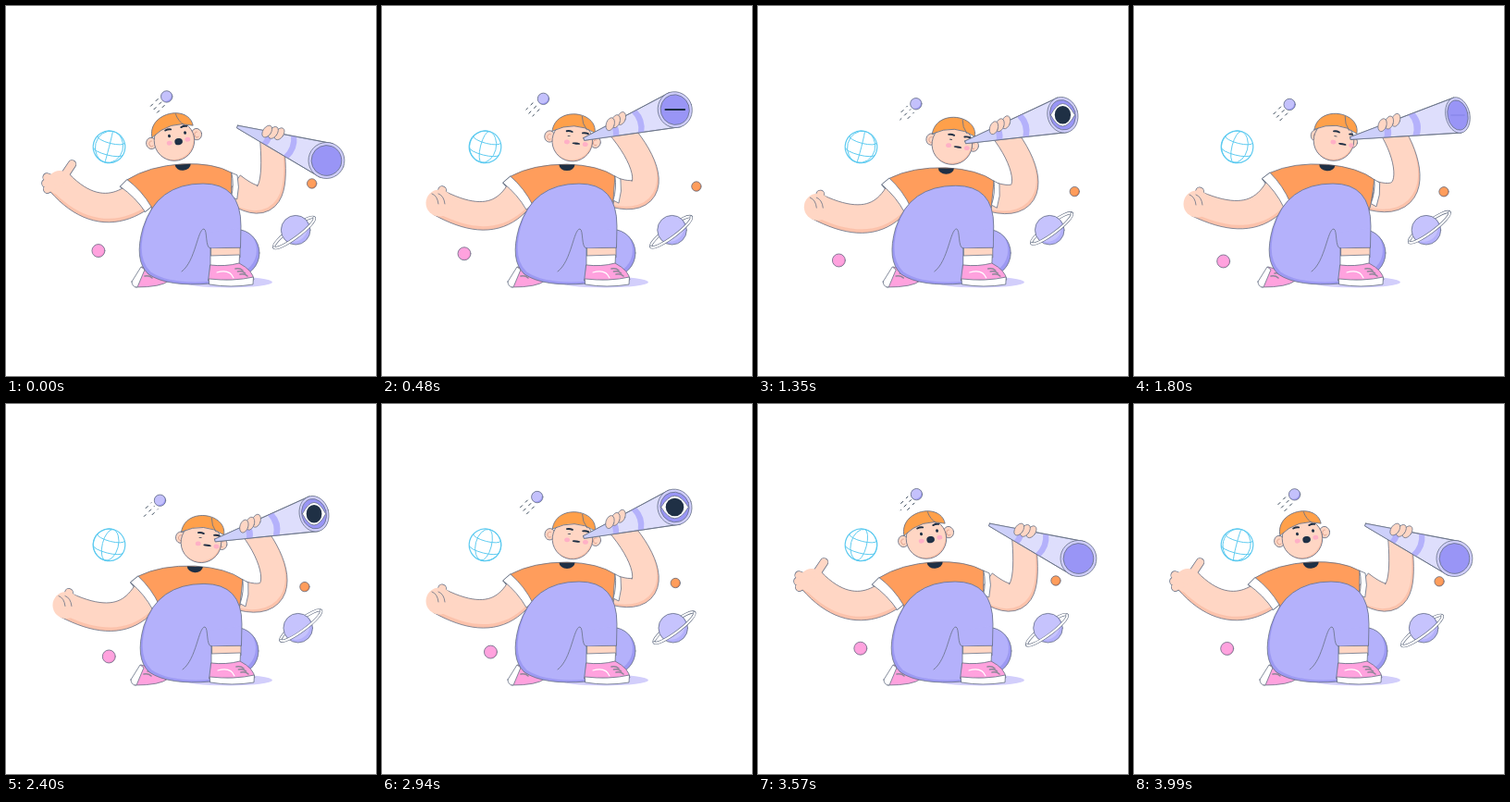
These frames come from a looping animation (400 by 400 pixels, 4.02 s). An HTML page with a canvas:

```html
<!DOCTYPE html>
<html lang="en">
<head>
<meta charset="utf-8">
<title>Stargazer</title>
<style>
html, body { margin: 0; width: 100%; height: 100%; overflow: hidden; background: #fff; }
canvas { display: block; width: 100vw; height: 100vh; }
</style>
</head>
<body>
<canvas id="stage"></canvas>
<script>
const canvas = document.getElementById('stage');
const ctx = canvas.getContext('2d');
const ratio = window.devicePixelRatio || 1;
canvas.width = canvas.height = 400 * ratio;

const LOOP = 4020, TAU = Math.PI * 2;
const LINE = '#667085', NAVY = '#1f3045', SKIN = '#ffd6c4', SKIN_DARK = '#fcc2ab', CYAN = '#5ccaf0';
const LILAC = '#b4b1fb', VIOLET = '#9c99f2', PALE = '#dedefc', PINK = '#ffa2de', ORANGE = '#ff9d5c';

// Key poses: resting, looking, leaning
const POSES = {
  head: [[182, 145.5, -.2], [206, 146, .13], [216, 145.5, .19]],          // x, y, tilt
  scope: [[250, 130.5, 346.5, 167, 19.5], [218, 144, 316.5, 111.5, 18.5], [234, 143, 350, 118, 13]], // tip, lens, lens width
  armL: [[143, 206, 118, 224, 88, 224, 58, 191], [149, 204, 130, 231, 102, 234, 62, 213], [157, 200, 138, 229, 110, 233, 68, 214]],
  armR: [[244, 196, 291, 231, 292, 190], [253, 202, 298, 214, 293, 172], [258, 205, 307, 218, 301, 168]]
};

// start, end, from, to
const MOVES = [[90, 540, 0, 1], [1140, 1600, 1, 2], [2160, 2640, 2, 1], [3250, 3550, 1, 0]];
const LIDS = [[990, 1200, 0, 1], [1690, 1790, 1, 0], [1820, 1950, 0, 1], [3150, 3260, 1, 0]];

const ease = k => k < .5 ? 4 * k ** 3 : 1 - (2 - 2 * k) ** 3 / 2;

function track(steps, t) {
  let v = steps[0][2];
  for (const [a, b, from, to] of steps) {
    if (t >= a) v = from + (to - from) * ease(Math.min(1, (t - a) / (b - a)));
  }
  return v;
}

function blend(list, s) {
  const i = Math.min(1, Math.floor(s));
  return list[i].map((v, j) => v + (list[i + 1][j] - v) * (s - i));
}

const path = d => new Path2D(d);

function oval(x, y, rx, ry = rx, rot = 0, from = 0, to = TAU) {
  const p = new Path2D();
  p.ellipse(x, y, rx, ry, rot, from, to);
  return p;
}

function segment(x, y, x2, y2) {
  const p = new Path2D();
  p.moveTo(x, y);
  p.lineTo(x2, y2);
  return p;
}

function stroke(p, color = LINE, width = .8) {
  ctx.strokeStyle = color;
  ctx.lineWidth = width;
  ctx.stroke(p);
}

function fill(p, color, line = LINE) {
  ctx.fillStyle = color;
  ctx.fill(p);
  if (line) stroke(p, line);
}

function shaded(p, base, dark, dx, dy) {
  fill(p, dark, null);
  ctx.save();
  ctx.clip(p);
  ctx.translate(dx, dy);
  fill(p, base, null);
  ctx.restore();
  stroke(p);
}

function inFrame(x, y, rot, paint) {
  ctx.save();
  ctx.translate(x, y);
  ctx.rotate(rot);
  paint();
  ctx.restore();
}

// Tapered tube along a cubic curve
function tube([x0, y0, x1, y1, x2, y2, x3, y3], wide, narrow) {
  const left = [], right = [], steps = 20;
  for (let i = 0; i <= steps; i++) {
    const k = i / steps, m = 1 - k;
    const at = (a, b, c, d) => m**3 * a + 3*m*m*k * b + 3*m*k*k * c + k**3 * d;
    const slope = (a, b, c, d) => m*m * (b - a) + 2*m*k * (c - b) + k*k * (d - c);
    const dx = slope(x0, x1, x2, x3), dy = slope(y0, y1, y2, y3);
    const w = (wide + (narrow - wide) * k) / Math.hypot(dx, dy);
    const x = at(x0, x1, x2, x3), y = at(y0, y1, y2, y3);
    left.push([x - dy * w, y + dx * w]);
    right.unshift([x + dy * w, y - dx * w]);
  }
  const p = new Path2D();
  [...left, ...right].forEach(q => p.lineTo(...q));
  p.closePath();
  return p;
}

function globe(t) {
  const r = 17.3, spin = t / LOOP * TAU;
  inFrame(111.5, 152.3, .25, () => {
    stroke(oval(0, 0, r), CYAN, 1.2);
    for (let i = 0; i < 6; i++) {
      const a = spin + i * TAU / 6, x = Math.sin(a);
      if (Math.cos(a) < 0) continue;
      const from = x < 0 ? TAU / 4 : -TAU / 4;
      stroke(oval(0, 0, r * Math.abs(x), r, 0, from, from + TAU / 2), CYAN, .9);
    }
    for (const y of [-8, 5]) stroke(oval(0, y, Math.sqrt(r * r - y * y), 4, 0, 0, TAU / 2), CYAN, .9);
  });
}

function planets(t) {
  const wave = shift => Math.cos((t / LOOP + shift) * TAU);
  globe(t);

  const cx = 170.5 + 4 * wave(-.1), cy = 102 - 4.5 * wave(.07);
  ctx.save();
  ctx.setLineDash([3, 5]);
  ctx.lineDashOffset = -t / 45;
  for (let i = -1; i <= 1; i++) {
    const x = cx - 6 + i * 3.5, y = cy + 6 + i * 3.5, len = i ? 13 : 16;
    stroke(segment(x, y, x - len * .7, y + len * .7), NAVY, .9);
  }
  ctx.restore();
  shaded(oval(cx, cy, 6.2), '#c4c1fc', VIOLET, -1.2, -1.2);
  shaded(oval(101 + 16.5 * wave(.26), 270 - 6 * wave(.07), 7), PINK, '#f58fce', -1, -1);
  shaded(oval(330.7 + 13.5 * wave(-.25), 196 - 5 * wave(.1), 5.2), ORANGE, '#ec8449', -1, -1);

  const half = from => {
    const arc = oval(315.5 - 4 * wave(0), 242 + 3 * wave(0), 27, 5.5, -.64, from, from + TAU / 2);
    stroke(arc, LINE, 3.3);
    stroke(arc, '#fff', 2.1);
  };
  half(TAU / 2);
  shaded(oval(314.6 - 1.4 * wave(0), 242.2, 15.8), '#c6c3fd', LILAC, -3, -3);
  half(0);
}

function laces(x, y, dx, dy, count) {
  for (let i = 0; i < count; i++) {
    const sx = x + i * dx, sy = y + i * dy;
    stroke(path(`M${sx} ${sy}q5 -1 8 2`), '#8d8798', 1.6);
  }
}

function backLeg(lean) {
  fill(oval(240, 298.5, 48, 6), '#d2cefb', null);
  inFrame(-lean * 2, 0, 0, () => {
    fill(path('M147 282Q165 286 176 297Q168 304 140 304Z'), PINK);
    fill(path('M136 298L146 282L150 285L142 304Q136 304 136 298Z'), '#fff');
    laces(150, 292, 4, -3, 2);
    shaded(oval(249, 267, 25, 25.5), LILAC, VIOLET, -3, -3);
  });
}

function frontLeg(lean, dip) {
  inFrame(lean * 2, 0, 0, () => {
    fill(path('M222 256H253V272H222Z'), SKIN);
    fill(path('M220.5 270L252.5 269L252 281H221Z'), '#fff');
    const knee = 192 + dip * .6;
    const pants = path(`M221 262V300Q175 304 154 290Q138 275 148 240Q163 ${knee} 213 ${knee}Q254 ${knee} 254 238L253.5 261Z`);
    shaded(pants, LILAC, VIOLET, 2.5, -2.5);
    fill(path('M216 245L253 240V260.5L222 261.5Z'), LILAC, null);
    stroke(path('M190 287C205 276 207 241 214 241C218 242 215 262 221 262'));
    fill(path('M221 280Q237 282 252 278Q267 286 268 296L219 297Z'), PINK);
    fill(path('M219.5 295Q246 298 267.5 293L267 301Q243 305 220 301Z'), '#fff');
    stroke(path('M228 288Q242 284 246 294'), '#fff', 1.1);
    laces(248, 284, 2.5, 3, 3);
  });
}

function leftArm(bones, fist) {
  const [x, y] = bones.slice(6);
  const tips = [[-.98 - fist * .37, 24 - fist * 10]];   // thumb first
  for (let i = 0; i < 3; i++) tips.push([2.65 + i * .45 + fist * .55, 15 - fist * 7]);
  const fingers = tips.map(([a, r]) => segment(x, y, x + Math.cos(a) * r, y + Math.sin(a) * r));
  fingers.forEach(f => stroke(f, LINE, 9.6));
  shaded(tube(bones, 17, 14), SKIN, SKIN_DARK, 0, -4);
  fill(oval(x, y, 13 + fist * 1.5), SKIN, null);
  fingers.forEach(f => stroke(f, SKIN, 8));
  ctx.globalAlpha = fist;
  for (const dx of [0, 7]) stroke(path(`M${x - 8 + dx} ${y - 10}q6 2 7 11`));
  ctx.globalAlpha = 1;
}

function shirt(s, dip) {
  const twist = s - 1;
  return paint => inFrame(195.5 + 8 * twist, 184 + dip, .066 * twist, () => {
    ctx.translate(-195.5, -184);
    paint();
  });
}

function cloth() {
  fill(path('M163 215L139 184Q163 171 200 171Q234 172 252 184L250 210L245 232H162Z'), ORANGE);
  fill(path('M139 184Q154 197 163 215L156 220Q147 204 131 191Z'), '#fff');
  fill(path('M252 184L258 187Q260 200 256 213L250 210Q254 197 252 184Z'), '#fff');
  fill(oval(200, 171.5, 8.5, 6.5, 0, 0, TAU / 2), NAVY, null);
}

function head([x, y, tilt], look, lean, dip) {
  inFrame(x, y + dip, tilt, () => {
    for (const side of [-1, 1]) {
      const ex = side * (25 - lean * 5);
      fill(oval(ex, -2, 5.5, 6.2), SKIN);
      stroke(oval(ex, -1.5, 2.4, 3, 0, 1, 5), '#d99a86');
    }
    const face = oval(0, 0, 21.8);
    shaded(face, SKIN, SKIN_DARK, -1, -1.5);
    fill(path('M-23 -8C-23 -36 23 -36 23 -12Q0 -23 -23 -8Z'), '#ffa04a');
    stroke(path('M7 -28Q8 -20 14 -14'));
    ctx.clip(face);
    const cx = 4.3 + lean * 5.5;
    for (const side of [-1, 1]) {
      const bx = cx + side * 8.7, by = -12.7 + look * 2.7;
      fill(oval(cx + side * 10, 1.6, 3, 2.4), '#ffb0c6', null);
      stroke(path(`M${bx - 3} ${by}q3 -1 6 0`), NAVY, 1.9);
      fill(oval(bx, -6 + look, 1.5 + look * .3, 1.8 - look * 1.4), NAVY, null);
    }
    fill(oval(cx, 2, 4.3, 3.6 - look * 2.6), NAVY, null);
  });
}

// Points on the telescope: u runs along it, side goes from edge to edge
function tubeFrame([tx, ty, ex, ey]) {
  const rot = Math.atan2(ey - ty, ex - tx);
  const at = (u, side) => {
    const w = (1.4 + 18.1 * u) * side;
    return [tx + (ex - tx) * u - Math.sin(rot) * w, ty + (ey - ty) * u + Math.cos(rot) * w];
  };
  return { at, rot };
}

function scope(pose, { at, rot }, open, s) {
  const [, , ex, ey, rx] = pose, ry = 19.5;
  const part = (a, b) => {
    const p = new Path2D();
    p.moveTo(...at(a, -1));
    p.lineTo(...at(b, -1));
    p.quadraticCurveTo(...at(b * 1.1, 0), ...at(b, 1));
    p.lineTo(...at(a, 1));
    p.quadraticCurveTo(...at(a * 1.1, 0), ...at(a, -1));
    return p;
  };
  const body = part(0, 1);
  fill(body, PALE);
  fill(part(0, .3), '#cdd0fa', null);
  for (const u of [.3, .56]) fill(part(u, u + .06), LILAC, null);
  stroke(body);
  fill(oval(ex, ey, rx, ry, rot), '#d0cefd');
  const lx = rx * .84, ly = ry * .84;
  fill(oval(ex, ey, lx, ly, rot), '#9995f6');
  if (s < .95) return;

  const w = lx * .95, h = ly * 1.5 * open;
  if (open < .12) {
    const wide = s < 1.5;
    stroke(segment(ex - w * .7, ey, ex + w * .7, ey), wide ? NAVY : '#7b7ce0', wide ? 2 : .8);
    return;
  }
  const almond = path(`M${ex - w} ${ey}Q${ex} ${ey - h} ${ex + w} ${ey}Q${ex} ${ey + h} ${ex - w} ${ey}Z`);
  fill(almond, '#fff');
  ctx.save();
  ctx.clip(almond);
  fill(oval(ex, ey, lx * .63, 9.8), NAVY, null);
  ctx.restore();
}

function draw(t) {
  const s = track(MOVES, t), look = Math.min(1, s), lean = Math.max(0, s - 1);
  const dip = 4 * Math.abs(Math.sin(Math.PI * s));
  const pose = blend(POSES.scope, s), frame = tubeFrame(pose);
  const wear = shirt(s, dip);
  ctx.setTransform(ratio, 0, 0, ratio, 0, 0);
  ctx.fillStyle = '#fff';
  ctx.fillRect(0, 0, 400, 400);
  ctx.lineCap = ctx.lineJoin = 'round';
  planets(t);
  backLeg(lean);

  wear(() => fill(path('M131 191L139 184L163 215L156 220Z'), NAVY));
  inFrame(0, dip, 0, () => {
    leftArm(blend(POSES.armL, s), look);
    shaded(tube([...blend(POSES.armR, s), ...frame.at(.37, -.4)], 16, 12.5), SKIN, SKIN_DARK, -2, -3);
  });
  wear(cloth);
  head(blend(POSES.head, s), look, lean, dip);
  inFrame(0, dip, 0, () => {
    scope(pose, frame, track(LIDS, t), s);
    for (let i = 2; i >= 0; i--) {
      fill(oval(...frame.at(.31 + i * .065, -.95), 4.4, 7.2, .6 - look * .28), SKIN);
    }
  });
  frontLeg(lean, dip);
}

const start = performance.now();
function tick() {
  draw((performance.now() - start) % LOOP);
  requestAnimationFrame(tick);
}
tick();
</script>
</body>
</html>
```
